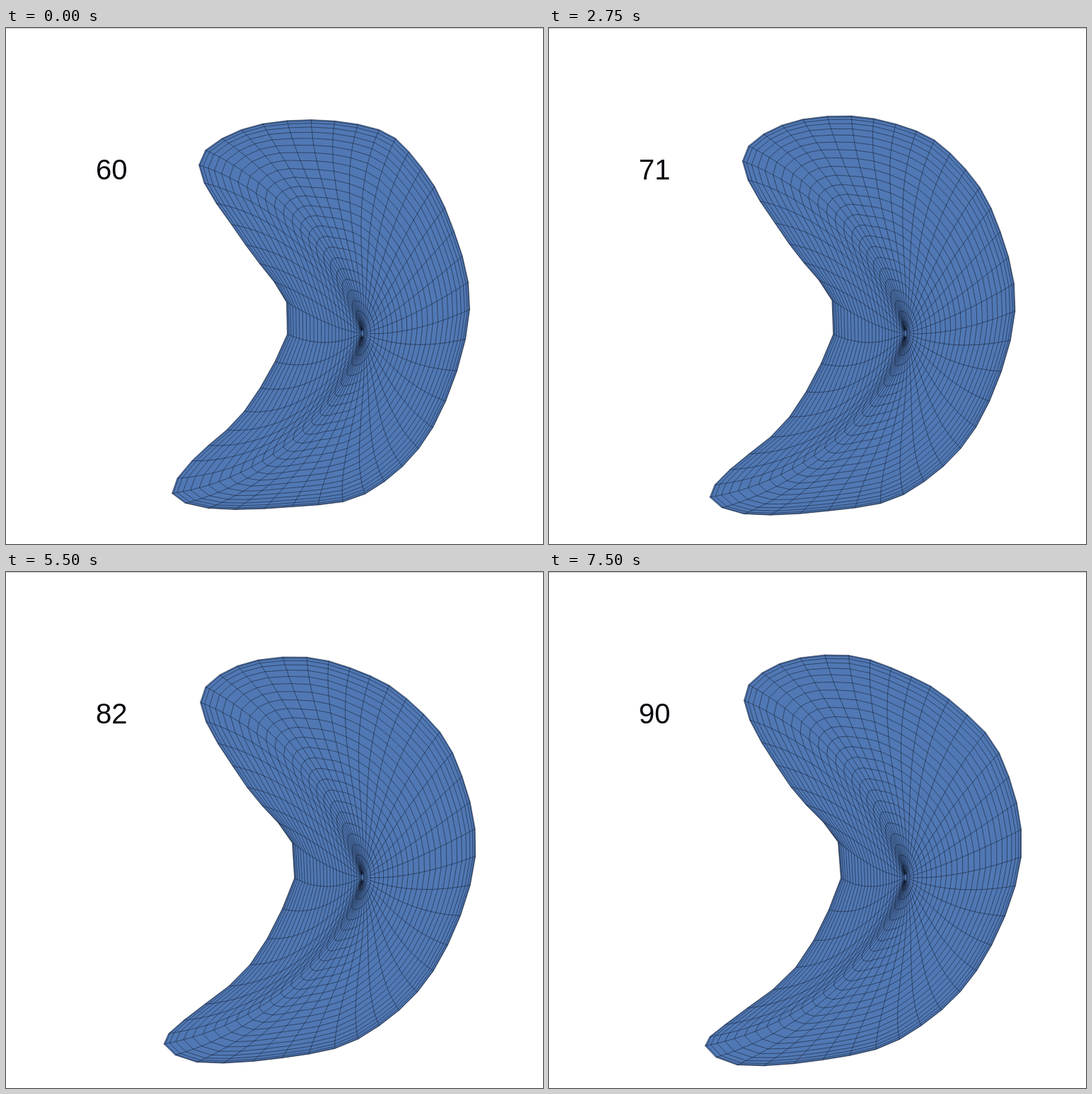
Animation, 759 px wide and 729 px high, one loop 7.75 s. Source, as an HTML page with a canvas:

```html
<!DOCTYPE html>
<html lang="en">
<head>
<meta charset="utf-8">
<title>Deforming mesh</title>
<style>
html, body { margin: 0; width: 100%; height: 100%; overflow: hidden; background: #fff; }
canvas { display: block; }
</style>
</head>
<body>
<canvas id="stage" width="759" height="729"></canvas>
<script>
const ctx = document.getElementById('stage').getContext('2d');
const STEP = 250, STEPS = 31, FIRST = 60;
const MERIDIANS = 50, RINGS = 25;
const POLE = { x: 503, y: 431 };

// Key points of the silhouette: meridian, start x, y and total drift x, y.
const keys = [
  [0, 272, 193, 3, -12], [3, 332, 143, -7, -14], [6, 431, 129, -8, -12], [9, 527, 143, -15, 4],
  [11, 569, 174, -4, 5], [14, 620, 253, 16, 2], [18, 655, 397, 12, 5], [22, 603, 564, 1, -1],
  [26, 507, 658, -12, 2], [29, 404, 676, -18, 13], [32, 285, 678, -20, 18], [34, 234, 657, -14, 12],
  [36, 262, 611, -14, 28], [39, 336, 541, 12, 17], [42, 397, 432, 15, 0], [43, 396, 387, 12, -6],
  [46, 338, 306, 3, -3]
];

function keyAt(n) {
  const turns = Math.floor(n / keys.length);
  const [i, ...values] = keys[n - turns * keys.length];
  return { i: i + turns * MERIDIANS, values };
}

// Closed Hermite spline through the key points.
function silhouette(i) {
  const next = keys.findIndex(key => key[0] > i);
  const n = (next < 0 ? keys.length : next) - 1;
  const [a, b, c, d] = [n - 1, n, n + 1, n + 2].map(keyAt);
  const span = c.i - b.i, t = (i - b.i) / span;
  return b.values.map((from, j) => {
    const to = c.values[j];
    const slopeIn = (to - a.values[j]) / (c.i - a.i) * span;
    const slopeOut = (d.values[j] - from) / (d.i - b.i) * span;
    const blend = t * t * (3 - 2 * t);
    return from + (to - from) * blend + slopeIn * t * (1 - t) ** 2 - slopeOut * t * t * (1 - t);
  });
}

// Ring spacing tightens towards the silhouette.
function ringRadius(k) {
  const s = 0.012 + 0.988 * (k / RINGS) ** 1.1;
  return 1.2 * s - 0.2 * s ** 6;
}

const edge = Array.from({ length: MERIDIANS }, (_, i) => silhouette(i));
const radii = Array.from({ length: RINGS + 1 }, (_, k) => ringRadius(k));

// Each meridian leaves the pole on a tall ellipse and bends to the silhouette.
function meridian(i, progress) {
  const [x, y, dx, dy] = edge[i];
  const endX = x + dx * progress ** (dx > 0 ? 1.25 : 0.65) - POLE.x;
  const endY = y + dy * progress ** 0.8 - POLE.y;
  const angle = (i - 17.8) * 2 * Math.PI / MERIDIANS;
  const c = Math.cos(angle), s = Math.sin(angle);
  const midX = (55 + 12 * c) * c, midY = 180 * s;
  const lean = 150 * s * s, sag = 192 * s * Math.max(0, -c);
  return radii.map(u => {
    const w = 2 * u * (1 - u), bend = u ** 1.5 * (1 - u);
    return [
      POLE.x + w * midX + u * u * endX - bend * lean,
      POLE.y + w * midY + u * u * endY + bend * sag
    ];
  });
}

function addPath(points, closed) {
  points.forEach(([x, y], n) => n ? ctx.lineTo(x + 0.5, y + 0.5) : ctx.moveTo(x + 0.5, y + 0.5));
  if (closed) ctx.closePath();
}

function draw(step) {
  const lines = edge.map((_, i) => meridian(i, step / (STEPS - 1)));
  ctx.fillStyle = '#fff';
  ctx.fillRect(0, 0, 759, 729);
  ctx.fillStyle = '#c4c4c4';
  ctx.fillRect(0, 0, 759, 1);

  ctx.beginPath();
  addPath(lines.map(line => line[RINGS]), true);
  ctx.fillStyle = '#5078b4';
  ctx.fill();

  ctx.beginPath();
  lines.forEach(line => addPath(line, false));
  radii.forEach((_, k) => addPath(lines.map(line => line[k]), true));
  ctx.strokeStyle = '#0c1220';
  ctx.lineWidth = 0.5;
  ctx.lineJoin = 'round';
  ctx.stroke();

  ctx.fillStyle = '#05050c';
  ctx.font = '40px "Liberation Sans", Arial, sans-serif';
  ctx.fillText(FIRST + step, 127, 214);
}

const start = performance.now();
let shown = -1;
function tick() {
  const step = Math.floor((performance.now() - start) / STEP) % STEPS;
  if (step !== shown) draw(shown = step);
  requestAnimationFrame(tick);
}
tick();
</script>
</body>
</html>
```
